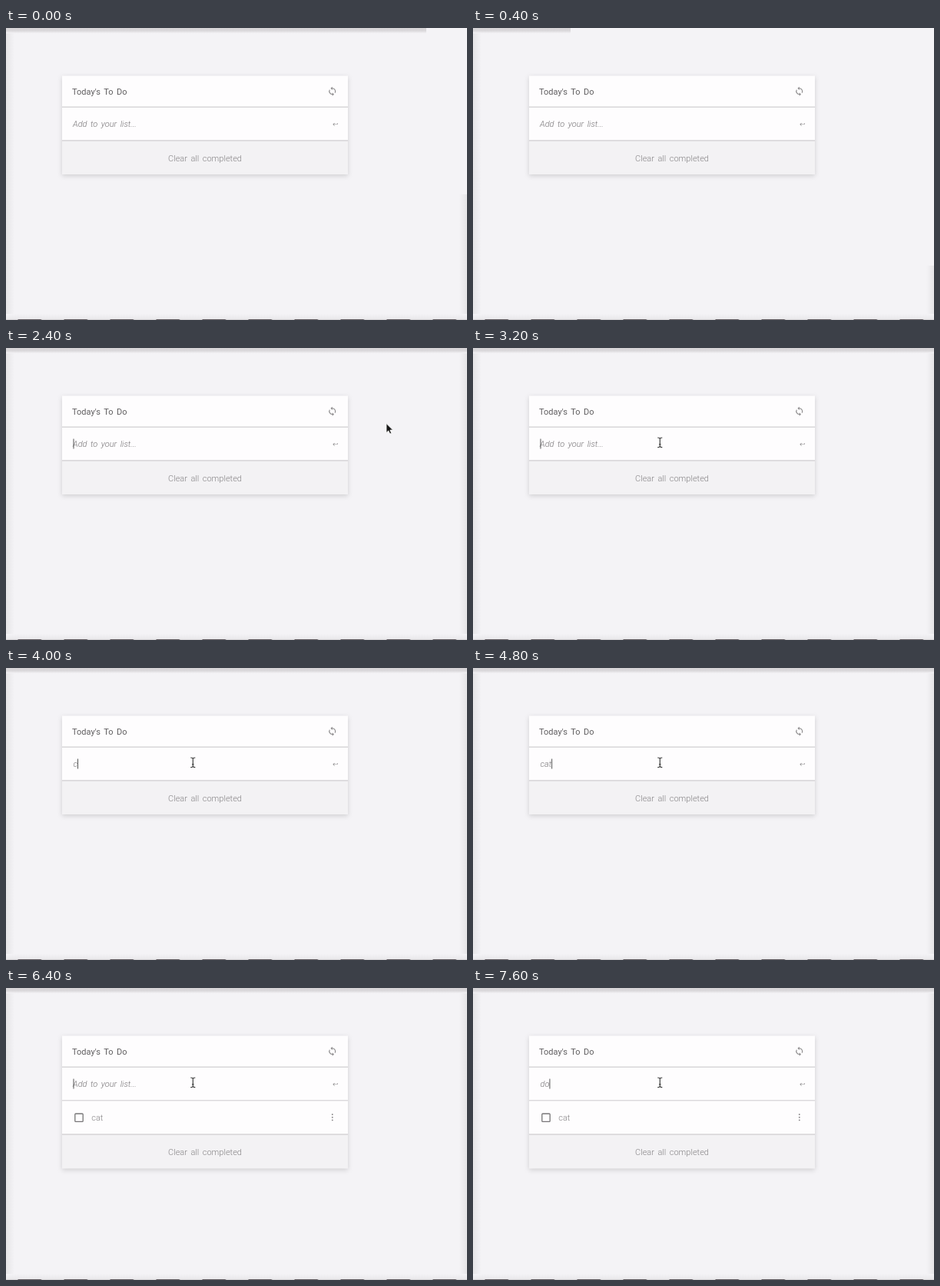
Animation, 600 px wide and 381 px high, one loop 8000 ms. Source, as an HTML page:

```html
<!DOCTYPE html>
<html lang="en">
<head>
<meta charset="utf-8">
<title>To do list</title>
<style>
  html, body { margin: 0; height: 100%; overflow: hidden; background: #f4f3f6; }
  svg { display: block; }
  text { font: 300 11px Roboto, sans-serif; word-spacing: 1.8px; fill: #858385; }
  .heading { font-weight: 400; fill: #5f5d5f; }
  .entry { font-style: italic; fill: #777577; }
  .rule { fill: #cfcdd0; }
  .icon { fill: #8b898b; }
  .card { filter: drop-shadow(0 2px 3px rgba(0, 0, 0, .15)); }
</style>
</head>
<body>
<svg width="600" height="381" viewBox="0 0 600 381">
  <defs>
    <linearGradient id="down" x2="0" y2="1">
      <stop stop-color="#d6d4d6"/><stop offset=".5" stop-color="#dad8db"/><stop offset="1" stop-color="#f4f3f6"/>
    </linearGradient>
    <linearGradient id="side">
      <stop stop-color="#e6e5e7"/><stop offset="1" stop-color="#f4f3f6"/>
    </linearGradient>
    <linearGradient id="up" x2="0" y2="1">
      <stop stop-color="#f4f3f6"/><stop offset="1" stop-color="#e8e7e9"/>
    </linearGradient>
    <pattern id="stripes" x="15" y="379" width="60" height="2" patternUnits="userSpaceOnUse">
      <path fill="#d5d3d6" d="M0 1H60V2H0Z"/>
      <path fill="#5d575c" d="M1 1H32L30 2H0Z"/>
    </pattern>
  </defs>

  <rect width="600" height="381" fill="#f4f3f6"/>
  <rect width="11" height="381" fill="url(#side)"/>
  <rect id="rightEdge" width="10" height="381" fill="url(#side)"/>
  <rect y="373" width="600" height="8" fill="url(#up)"/>
  <rect id="topEdge" height="7" fill="url(#down)"/>
  <rect y="379" width="600" height="2" fill="url(#stripes)"/>

  <g class="card">
    <rect id="base" x="73" y="62.5" width="372" fill="#f3f2f4"/>
    <rect x="73" y="62.5" width="372" height="84" fill="#fefdfe"/>
    <rect class="rule" x="73" y="102.5" width="372" height="1.2"/>
    <rect class="rule" x="73" y="146.3" width="372" height="1.2"/>
  </g>

  <text class="heading" x="86" y="86.5">Today's To Do</text>
  <path class="icon" transform="translate(418 75.9) scale(.56)" d="M12 4V1L8 5l4 4V6c3.3 0 6 2.7 6 6 0 1-.25 2-.7 2.8l1.46 1.46A8 8 0 0 0 12 4zm0 14a6 6 0 0 1-5.3-8.8L5.24 7.74A8 8 0 0 0 12 20v3l4-4-4-4z"/>
  <path class="icon" transform="translate(424.7 121.8) scale(.33)" d="M19 7v4H5.8l3.6-3.6L8 6l-6 6 6 6 1.4-1.4L5.8 13H21V7z"/>

  <text id="hint" class="entry" x="87" y="129">Add to your list...</text>
  <text id="typed" class="entry" x="87.5" y="129"></text>
  <rect id="caret" y="118.5" width="1" height="13" fill="#555"/>

  <g id="item">
    <rect x="73" y="147.5" width="372" height="43" fill="#fefdfe"/>
    <rect class="rule" x="73" y="190.4" width="372" height="1.2"/>
    <rect x="89.8" y="164" width="10.4" height="10.4" rx="1" fill="none" stroke="#777577" stroke-width="1.3"/>
    <text x="111.3" y="172.5">cat</text>
    <path d="M424.8 165v0m0 3.7v0m0 3.7v0" stroke="#8b898b" stroke-width="1.9" stroke-linecap="round"/>
  </g>
  <text id="clear" x="259" text-anchor="middle">Clear all completed</text>

  <path id="arrow" d="M0 0V12L2.8 9.4L4.7 13.6L6.7 12.7L4.9 8.6H8.6Z" fill="#161616" stroke="#fff" stroke-width=".8"/>
  <path id="beam" d="M-3 -6.3Q0 -6.3 0 -4.8Q0 -6.3 3 -6.3M0 -5V5M-3 6.3Q0 6.3 0 4.8Q0 6.3 3 6.3M-1.3 2.5H1.3" fill="none" stroke="#333" stroke-width="1.1"/>
</svg>
<script>
const LOOP = 8000, SUBMITTED = 5200;

// Each row: start time, then the values that hold until the next row.
const edges = [[0, 547, 217], [400, 127, 310], [2400, 600, 0]];   // top width, right start
const entry = [                                                  // typed text, caret shown
  [0, '', 0], [2400, '', 1], [2600, '', 0], [3200, '', 1], [3800, '', 0],
  [4000, 'c', 1], [4200, 'ca', 1], [4800, 'cat', 1], [SUBMITTED, '', 0],
  [6400, '', 1], [7000, '', 0], [7200, 'd', 1], [7600, 'do', 1]
];
const pointer = [                                                // shape, x, y
  [0, '', 0, 0], [600, 'arrow', 485, 16.5], [1000, 'arrow', 490, 78.5],
  [1200, 'arrow', 500, 88.5], [1400, 'arrow', 506, 95], [1600, 'arrow', 508.3, 97],
  [2400, 'arrow', 495, 98.5], [2600, 'beam', 302, 124.5], [2800, 'beam', 260, 125],
  [3000, 'beam', 245, 124.5], [3200, 'beam', 243.3, 123.3]
];

const el = id => document.getElementById(id);
const at = (rows, t) => rows.findLast(row => row[0] <= t).slice(1);
const show = (id, on) => el(id).setAttribute('visibility', on ? 'visible' : 'hidden');
const set = (id, attrs) => {
  for (const name in attrs) el(id).setAttribute(name, attrs[name]);
};

function draw(t) {
  const [topWidth, rightStart] = at(edges, t);
  set('topEdge', { width: topWidth });
  set('rightEdge', { transform: `matrix(-1 0 0 1 600 ${rightStart})` });

  const [text, caretOn] = at(entry, t);
  el('typed').textContent = text;
  show('hint', !text);
  show('caret', caretOn);
  set('caret', { x: 87.5 + (text && el('typed').getComputedTextLength()) });

  const added = t >= SUBMITTED;
  show('item', added);
  set('base', { height: added ? 173 : 128.5 });
  set('clear', { y: added ? 217.5 : 173.5 });

  const [shape, x, y] = at(pointer, t);
  for (const id of ['arrow', 'beam']) {
    show(id, id === shape);
    set(id, { transform: `translate(${x} ${y})` });
  }
}

function tick() {
  draw(performance.now() % LOOP);
  requestAnimationFrame(tick);
}
tick();
</script>
</body>
</html>
```
